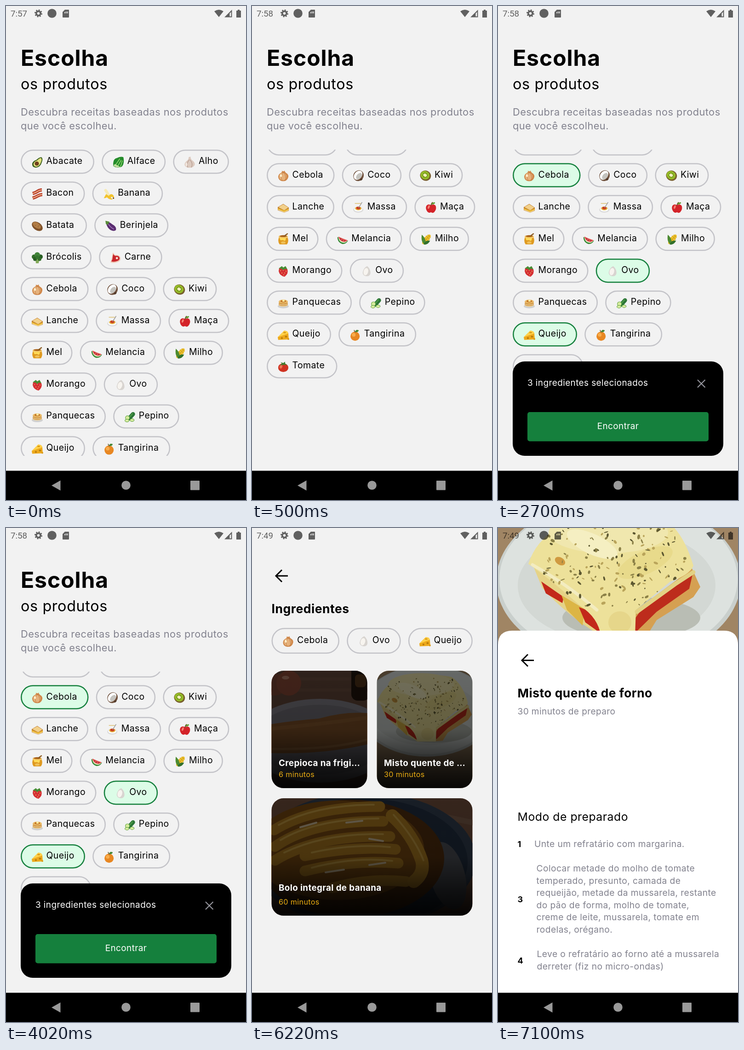
An HTML page for the animation above (8000 ms loop, 522 px wide and 1073 px high).

```html
<!DOCTYPE html>
<html lang="pt">
<head>
<meta charset="utf-8">
<title>Receitas</title>
<style>
html, body { margin: 0; width: 100%; height: 100%; overflow: hidden; background: #f2f2f2; }
svg { display: block; width: 522px; height: 1073px; }
text { font-family: Inter, "Open Sans", sans-serif; letter-spacing: .02em; white-space: pre; }
.clock { font-family: Roboto, sans-serif; letter-spacing: 0; }
</style>
</head>
<body>
<svg id="stage" viewBox="0 0 522 1073"></svg>
<script>
const stage = document.getElementById('stage');
const GREY = '#82828e', GREEN = '#15803d';

const rect = (x, y, w, h, r, fill, stroke = 'none') =>
  `<rect x="${x}" y="${y}" width="${w}" height="${h}" rx="${r}" fill="${fill}" stroke="${stroke}" stroke-width="2.5"/>`;
const oval = (x, y, rx, ry, fill, turn = 0) =>
  `<ellipse cx="${x}" cy="${y}" rx="${rx}" ry="${ry}" fill="${fill}" transform="rotate(${turn} ${x} ${y})"/>`;
const disc = (x, y, r, fill) => oval(x, y, r, r, fill);
const shape = (d, fill) => `<path d="${d}" fill="${fill}"/>`;
const line = (d, color, w = 1, cap = 'round') =>
  `<path d="${d}" fill="none" stroke="${color}" stroke-width="${w}" stroke-linecap="${cap}"/>`;
const text = (x, y, s, size, fill = '#000', weight = 400, extra = '') =>
  `<text x="${x}" y="${y}" font-size="${size}" fill="${fill}" font-weight="${weight}" ${extra}>${s}</text>`;
const move = (x, y, body, scale = 1) => `<g transform="translate(${x} ${y}) scale(${scale})">${body}</g>`;
const clip = (id, area, body) => `<clipPath id="${id}">${area}</clipPath><g clip-path="url(#${id})">${body}</g>`;

// Food icons, about 24 px wide around 0,0
const art = {
  Abacate: shape('M9-11Q13-8 10 0Q7 11-3 12Q-12 11-11 3Q-9-3-2-5Q4-11 9-11Z', '#3c5f1e') +
    shape('M8-9Q11-6 8 0Q5 9-2 10Q-9 9-8 3Q-6-2 0-4Q5-9 8-9Z', '#e2e27f') + disc(-1, 3, 4.6, '#70401d'),
  Alface: shape('M-11 2Q-10-8-3-9Q4-13 11-11Q13-3 11 4Q9 11 3 11Q-5 13-11 8Z', '#238b2a') +
    line('M-8 9L3-7M-2 10L6-4M5 9L9-3', '#8bd06a', 1.8) + shape('M-11 7L-4 11L5 11L-7 4Z', '#c4dfa0'),
  Alho: shape('M-2-11L2-12Q2-6 7-3Q12 1 11 6Q8 12 0 12Q-9 12-11 6Q-11 1-6-3Q-2-6-2-11Z', '#dccabf') +
    line('M-1-5Q-8 3-4 11M1-5Q8 3 4 11', '#ae9388', 1.1) + oval(-7, 5, 2, 4, '#f3e9e1'),
  Bacon: line('M-10-1Q-3-3 1-6T10-9M-10 9Q-4 7 1 4T11 1', '#b93e2b', 7, 'butt') +
    line('M-10-1Q-3-3 1-6T10-9M-10 9Q-4 7 1 4T11 1', '#efb58d', 2, 'butt'),
  Banana: line('M-7-8Q-3-3 0 4', '#f6eab4', 6) + shape('M-6 0Q-3 2 0 4Q3-1 8 1Q12 4 11 9Q6 4 4 8Q8 10 8 12Q0 12-4 7Q-7 9-11 9Q-9 5-6 0Z', '#f2c32e') + disc(10, 9, 1.6, '#72501c'),
  Batata: oval(0, 1, 13, 8.5, '#80522a', 35) + oval(-1, -1, 10, 5.5, '#b17d46', 35) +
    disc(-4, -1, .8, '#71451f') + disc(2, 2, .8, '#71451f') + disc(4, -1, .8, '#71451f'),
  Berinjela: shape('M-9-8Q-3-9 2-4Q13 2 11 9Q7 13-1 9Q-8 4-10-4Z', '#5a2c70') +
    line('M-5-3Q0 4 6 7', '#a37abd', 1.6) + shape('M-12-11L-3-9L-7-2L-11-4Z', '#588b38'),
  'Brócolis': shape('M-4 1L5 1L3 12L-3 12Z', '#82a957') + disc(-7, -2, 5, '#326c29') + disc(7, -2, 5, '#285e23') +
    disc(0, -6, 6, '#408238') + disc(-5, 3, 4, '#285e23') + disc(5, 3, 4, '#326c29') + disc(0, -1, 4, '#35752e'),
  Carne: shape('M-6-11Q-3-10-2-6Q8-7 11 0Q12 6 6 9Q-4 13-11 10Q-9 5-8 0Z', '#f0c8b6') +
    shape('M-5-8Q-2-4 0-4Q8-5 9 1Q9 5 4 7Q-3 10-9 8Q-6 3-6-3Z', '#c8252b') + disc(3, 1, 2.4, '#f8e5d5'),
  Cebola: shape('M-3-11Q0-8 3-11Q3-8 6-6Q12-3 11 3Q9 12 0 12Q-10 12-11 3Q-11-3-5-6Q-2-8-3-11Z', '#d0884b') +
    oval(-1, 2, 8, 8, '#e6b27c') + line('M0-7Q-8 2-2 11M1-7Q8 2 4 11', '#b97338', .8) + oval(-5, 0, 2, 3, '#fff0cc'),
  Coco: oval(0, 0, 11, 12, '#70513d', 35) + oval(-1, -1, 8, 11, '#fff', 40) +
    oval(1, 1, 5, 8, '#c4c3be', 40) + oval(6, 8, 3, 2, '#533b2b', -40),
  Kiwi: oval(0, 0, 12, 11, '#78602d', 25) + oval(-1, -1, 10, 9, '#96bd27', 25) + oval(-1, -1, 4, 3, '#f1edc0', 25) +
    [0, 45, 90, 135, 180, 225, 270, 315].map(a => `<g transform="rotate(${a} -1 -1)">${disc(4, -1, .8, '#303c13')}</g>`).join(''),
  Lanche: shape('M-12-1L0-8L12 0V7L2 11L-12 6Z', '#bf7c2c') + shape('M-11-1L0-7L11 0L2 6Z', '#f2d08a') +
    line('M-11 3L2 8L11 4', '#eebd35', 2.5) + line('M-11 5L2 10L11 6', '#fff0bf', 1.2),
  Massa: oval(0, 5, 11, 6, '#dadada') + oval(0, 4, 9, 4.5, '#fff') + oval(0, 2, 7, 4, '#e6b443') +
    oval(0, 1, 4.5, 3, '#c83e21') + line('M1 0L8-11', '#989898', 1.5) + line('M-7-9H5', '#ddc071', 1.5),
  'Maça': shape('M0-5Q6-9 10-4Q13 3 7 10Q3 13 0 10Q-4 13-8 9Q-13 2-10-4Q-6-9 0-5Z', '#d42329') +
    line('M0-5Q1-9 3-11', '#65401d', 1.8) + oval(-5, -1, 2, 4, '#f38273', 20) + oval(5, -9, 4, 1.8, '#619d35', -25),
  Mel: shape('M-9-5H9Q13 4 8 11H-8Q-13 4-9-5Z', '#df9a20') + rect(-10, -8, 20, 5, 2, '#f2c76c') +
    shape('M-8-3Q-7 3-4 2T2 3T6-3Z', '#ffdb59') + oval(0, -7, 8, 2, '#a95e13') + line('M2-7L9-12', '#8b5c23', 2.5) + oval(0, 7, 5, 2.5, '#f0c15a'),
  Melancia: shape('M-11-5Q-11 6-1 10Q8 11 12 3Z', '#3a8a37') + shape('M-9-5Q-8 5 0 7Q8 9 11 2Z', '#e8f2ce') +
    shape('M-9-6Q-6 4 1 5Q7 7 11 2Q1-1-9-6Z', '#e24d4e') + [[-4, -1], [0, 2], [5, 3]].map(([x, y]) => disc(x, y, .8, '#372124')).join(''),
  Milho: oval(1, 0, 5.5, 13, '#eec22c', 40) + line('M-3-4L6 5M0-8L8 1M4-10L10-4M-4-1L3 7M-2 3L8-8', '#b58714', .8) +
    shape('M-9-10Q2 0-2 12Q-12 6-9-10Z', '#4c8a30') + shape('M-5 11Q-2 1 9 3Q4 13-5 11Z', '#32702b'),
  Morango: shape('M-9-6Q0-10 9-4Q12 5 3 12Q-8 10-10 0Z', '#d52f33') +
    [[-6, -1], [0, -2], [6, 0], [-3, 4], [3, 4], [1, 8]].map(([x, y]) => disc(x, y, .9, '#f4c477')).join('') +
    shape('M-10-6L-3-11L0-8L5-11L9-4L3-5L0-2L-3-5Z', '#478c34'),
  Ovo: shape('M2-11Q9-5 9 4Q8 11 1 11Q-8 10-8 3Q-6-8 2-11Z', '#d8d4d0') + oval(-1, 1, 5, 8, '#f7f4ef', 15),
  Panquecas: oval(0, 7, 12, 4.5, '#d0d0d0') + rect(-10, -3, 20, 10, 5, '#c78a3b') + line('M-9 2Q0 6 9 2M-9 5Q0 9 9 5', '#f1d294', 1.6) +
    oval(0, -3, 10, 4.5, '#e9b966') + oval(0, -4, 6, 2.5, '#c17429') + rect(-2, -7, 5, 4, 1, '#fff0a1'),
  Pepino: line('M-1 3L7-6', '#2c7637', 9) + line('M0 0L6-7', '#54a149', 2) + disc(-5, 2, 5, '#67a944') + disc(-5, 2, 3.8, '#d8eca0') +
    oval(-6, 8, 5, 3.5, '#559a3a') + oval(-6, 8, 4, 2.5, '#d8eca0') + oval(5, 7, 5, 3.5, '#559a3a') + oval(5, 7, 4, 2.5, '#d8eca0'),
  Queijo: shape('M-12 5L2-9Q10-9 11-3L12 10L-11 11Z', '#eda91c') + shape('M-12 5L2-9Q10-9 11-3Z', '#ffd24b') +
    disc(-3, 7, 2, '#b97b09') + oval(6, 4, 2.5, 2, '#b97b09') + oval(3, -5, 3, 1.5, '#d99816') + disc(11, 9, 2, '#d99816'),
  Tangirina: disc(0, 3, 10, '#e88722') + oval(-3, 0, 4, 4, '#f8ad4c') + shape('M0-6Q1-13 8-10Q7-5 0-6Z', '#458735') + line('M0-6L-2-10', '#65542a', 1.5),
  Tomate: oval(0, 2, 11, 9.5, '#cf3322') + oval(-5, 0, 3, 4, '#ed7452', 20) +
    shape('M0-4L-7-3L-3-7L-6-10L0-8L4-11L4-7L8-4Z', '#3f7e30')
};

const rows = [
  [['Abacate', 160], ['Alface', 139], ['Alho', 121.5]],
  [['Bacon', 139.5], ['Banana', 153.5]],
  [['Batata', 144], ['Berinjela', 161]],
  [['Brócolis', 154], ['Carne', 137.5]],
  [['Cebola', 147.5], ['Coco', 129.5], ['Kiwi', 117]],
  [['Lanche', 147], ['Massa', 142], ['Maça', 132]],
  [['Mel', 112.5], ['Melancia', 165.5], ['Milho', 129.5]],
  [['Morango', 164.5], ['Ovo', 117.5]],
  [['Panquecas', 185], ['Pepino', 143.5]],
  [['Queijo', 140], ['Tangirina', 169]],
  [['Tomate', 153.5]]
];

function chipRow(row, x, y, h, picked = []) {
  return row.map(([name, w]) => {
    const on = picked.includes(name), left = x;
    x += w + 16.2;
    return rect(left + 1.25, y + 1.25, w - 2.5, h - 2.5, h / 2 - 1.25, on ? '#dcfce7' : '#f2f2f2', on ? GREEN : '#c3c3c8') +
      move(left + 36, y + h / 2 + 1, art[name]) + text(left + 55.5, y + h / 2 + 5, name, 19.5);
  }).join('');
}

function statusBar(time) {
  return `<g opacity=".6">${text(10, 23, time, 18.7, '#000', 400, 'class="clock"')}
    <circle cx="70.5" cy="16" r="4.6" fill="none" stroke="#000" stroke-width="3.6"/>
    <circle cx="70.5" cy="16" r="7" fill="none" stroke="#000" stroke-width="3" stroke-dasharray="2.75"/>
    ${disc(100, 16, 9.8, '#000')}
    <path fill-rule="evenodd" d="M128 8H136Q137 8 137 9V24Q137 25 136 25H124Q123 25 123 24V13ZM127 13V16H128.500V13ZM130 12V16H131.500V12ZM133 12V16H134.500V12Z
      M453 11.500Q463 4.500 473 11.500L463 24ZM491.500 8V24.500H475ZM489.500 13V22.500H486.500V16ZM501 10H504V8H508V10H511V25H501Z"/></g>`;
}

const navBar = rect(0, 1009.5, 522, 64, 0, '#000') + shape('M99 1041.500L118.500 1030.500V1052.500Z', '#999') +
  disc(261, 1041, 9.8, '#999') + rect(401, 1031, 20, 20.5, 1, '#999');

const backArrow = y => move(52, y, '<path d="M13-13L0 0L13 13M0 0H26" fill="none" stroke="#000" stroke-width="3"/>');

function picker(time, scroll, picked) {
  const list = rows.map((row, i) => chipRow(row, 32, 312 + 69.15 * i - scroll, 52.5, picked)).join('');
  const panel = rect(32, 772, 458, 205, 26, '#000') + text(64, 825, '3 ingredientes selecionados', 19, '#fff') +
    line('M434 812L450.500 828.500M450.500 812L434 828.500', '#96969e', 2.2, 'butt') +
    rect(64, 882, 394, 63.5, 5, GREEN) + text(261, 919, 'Encontrar', 19, '#fff', 400, 'text-anchor="middle"');
  return rect(0, 0, 522, 1073, 0, '#f2f2f2') + text(32, 130, 'Escolha', 48, '#000', 700) +
    text(32, 181, 'os produtos', 32.3) +
    text(32, 238, 'Descubra receitas baseadas nos produtos', 21.8, GREY) + text(32, 267.5, 'que você escolheu.', 21.8, GREY) +
    clip('list', rect(0, 312, 522, 665, 0, '#000'), list) + (picked.length ? panel : '') + statusBar(time) + navBar;
}

// Baked sandwich on a plate
function sandwichPhoto() {
  let seed = 7, herbs = '';
  const rnd = () => (seed = seed * 16807 % 2147483647) / 2147483647;
  for (let i = 0; i < 190; i++) {
    const x = 100 + rnd() * 310, y = -15 + rnd() * 185;
    herbs += oval(x, y, 1.5 + rnd() * 4, 1 + rnd() * 2.2, ['#5c5730', '#8b8046', '#b9a45a'][i % 3], rnd() * 180);
  }
  const cheese = 'M66 78Q82 28 130 0L180-27Q270-36 360-20Q402 5 425 82Q416 103 375 116L300 178L298 235H224Q218 195 180 170Q110 108 66 78Z';
  return rect(-60, -100, 640, 560, 0, '#a08564') + oval(262, 115, 266, 180, '#c9cfcc') + oval(262, 111, 259, 174, '#dde2df') +
    oval(258, 125, 215, 125, '#d3d8d4') + oval(290, 195, 150, 45, '#b9bdb4') +
    shape('M78 86L96 130Q150 190 225 235L300 232L240 150Z', '#e6d387') +
    shape('M94 116L104 142L140 163L143 150Z', '#c3281a') + shape('M138 146L150 178L184 212L188 176Z', '#dcb545') +
    shape('M176 172L190 205L232 235L226 190Z', '#c3281a') +
    shape('M422 88L440 128L425 150L345 200L325 232L285 235L288 188Z', '#d5a052') +
    shape('M424 97L416 132L345 182L300 226L292 205L310 180L385 120Z', '#bd2c1c') +
    shape(cheese, '#ede19a') + oval(240, 10, 130, 45, '#f0e7ae') +
    line('M75 80Q150 122 215 178', '#f3ecc0', 7) + line('M302 182L385 122L425 96', '#e3d184', 9) +
    oval(265, 205, 25, 24, '#e6d68a') + oval(205, 35, 60, 22, '#f5efc2', 25) +
    oval(320, 75, 65, 25, '#e8da8b', -25) + oval(135, 72, 12, 8, '#d09a40', 30) +
    clip('cheese', shape(cheese, '#000'), herbs);
}

const crepePhoto = rect(42, 310, 209, 256, 0, '#65483a') + line('M43 328H250M43 352H250', '#6d4e3f', 7) +
  disc(50, 340, 24, '#7c4534') + disc(80, 337, 27, '#8b4a37') + oval(73, 325, 8, 4, '#b5816c') +
  rect(216, 300, 40, 75, 14, '#21150c') + rect(224, 318, 24, 28, 8, '#523418') +
  oval(147, 462, 160, 91, '#85828a') + oval(147, 460, 145, 76, '#75727a') +
  shape('M42 426Q92 418 145 414Q200 398 251 402V470Q155 492 42 489Z', '#835329') +
  line('M43 436Q150 426 250 412', '#8e5d30', 8) + line('M43 480Q170 482 250 460', '#95673a', 5);

const cakePhoto = rect(42, 587, 438, 256, 0, '#75513e') + line('M300 602L480 640', '#81604c', 12) +
  oval(245, 720, 242, 146, '#344153') + oval(245, 725, 224, 138, '#233144') + oval(425, 755, 38, 75, '#50535a', -15) +
  oval(215, 718, 203, 128, '#55300f') + oval(187, 700, 188, 108, '#7d4c12') +
  line('M48 656Q130 605 278 605M50 692Q130 635 285 637M50 722Q140 666 300 670M115 712Q220 690 312 698M115 745Q215 720 318 728M175 782Q250 760 335 768', '#b07c20', 23) +
  line('M58 645Q140 601 265 601M62 678Q140 632 275 631M70 705Q160 662 285 665M130 705Q220 685 300 693M130 738Q220 714 305 723', '#cba043', 4) +
  line('M305 625Q350 665 369 722Q376 750 352 768', '#b48122', 28) + line('M308 623Q355 675 373 722', '#cba043', 4) +
  line('M105 650L140 640M205 640L240 636M160 748L200 742M255 675L285 680M255 732L290 727', '#d2bf9c', 4);

function card(id, x, y, w, photo, title, time) {
  const low = w > 300 ? 6 : 0;
  return clip(id, rect(x, y, w, 255, 26, '#000'), photo + rect(x, y, w, 255, 0, 'url(#shade)')) +
    text(x + 15.5, y + 206.5 - low, title, 18.8, '#fff', 700) +
    text(x + 15.5, y + 230.5, time, 16.2, '#e9ac12');
}

function results() {
  return rect(0, 0, 522, 1073, 0, '#f2f2f2') +
    `<linearGradient id="shade" x2="0" y2="1"><stop stop-opacity=".54"/><stop offset=".5" stop-opacity=".58"/>
     <stop offset=".8" stop-opacity=".82"/><stop offset="1" stop-opacity=".95"/></linearGradient>` +
    backArrow(104) + text(42.5, 185, 'Ingredientes', 26.5, '#000', 700) +
    chipRow([['Cebola', 147.5], ['Ovo', 117.5], ['Queijo', 140]], 42.5, 217, 56) +
    card('crepe', 42.5, 310, 208, crepePhoto, 'Crepioca na frigi…', '6 minutos') +
    card('toast', 271.5, 310, 208, move(236, 334.5, sandwichPhoto(), .55), 'Misto quente de …', '30 minutos') +
    card('cake', 42.5, 587, 437, cakePhoto, 'Bolo integral de banana', '60 minutos') + statusBar('7:49') + navBar;
}

function recipe() {
  const step = (n, ny, x, y, lines) => text(42.5, ny, n, 18, '#000', 700) +
    lines.map((s, i) => text(x, y + 26.6 * i, s, 19.3, GREY)).join('');
  return sandwichPhoto() + shape('M0 1073V254Q0 223 31 223H491Q522 223 522 254V1073Z', '#fff') + backArrow(287.5) +
    text(42.5, 368, 'Misto quente de forno', 26.3, '#000', 700) + text(42.5, 405, '30 minutos de preparo', 19.1, GREY) +
    text(42.5, 636, 'Modo de preparado', 24.8) +
    step(1, 693, 79, 693, ['Unte um refratário com margarina.']) +
    step(3, 812.5, 83.5, 746, ['Colocar metade do molho de tomate', 'temperado, presunto, camada de',
      'requeijão, metade da mussarela, restante', 'do pão de forma, molho de tomate,',
      'creme de leite, mussarela, tomate em', 'rodelas, orégano.']) +
    step(4, 945.5, 84.5, 932, ['Leve o refratário ao forno até a mussarela', 'derreter (fiz no micro-ondas)']) +
    statusBar('7:49') + navBar;
}

const scenes = [
  [500, picker('7:57', 0, [])],
  [2700, picker('7:58', 247.3, [])],
  [4900, picker('7:58', 247.3, ['Cebola', 'Ovo', 'Queijo'])],
  [7100, results()],
  [8000, recipe()]
];
let shown;
function draw() {
  const t = performance.now() % 8000;
  const scene = scenes.find(([end]) => t < end);
  if (scene !== shown) stage.innerHTML = (shown = scene)[1];
  requestAnimationFrame(draw);
}
draw();
</script>
</body>
</html>
```
